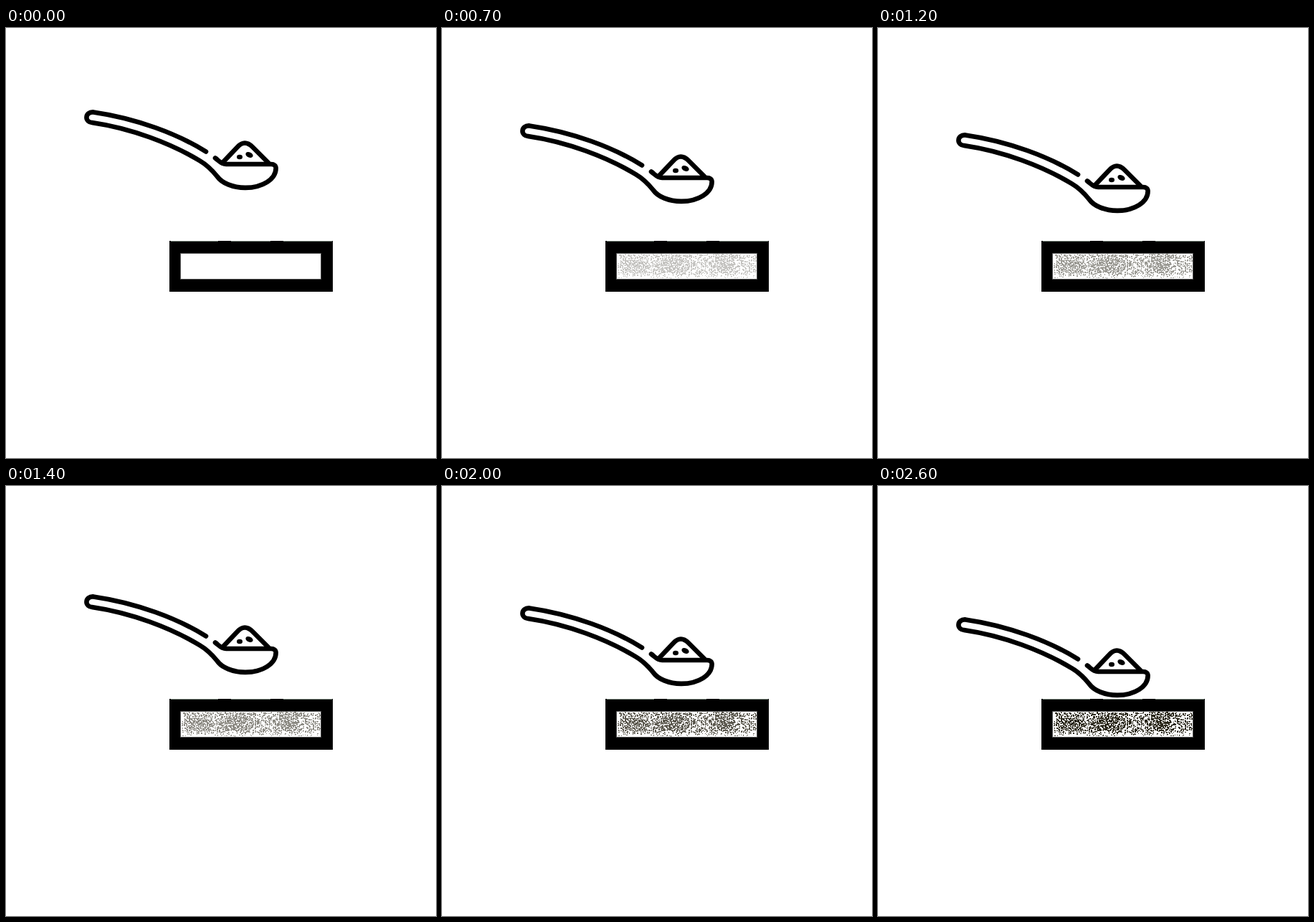
Recreate the animation shown at these times as an HTML page. Size 600 by 600 pixels, loop 3.6 s.

```html
<!DOCTYPE html>
<html lang="en">
<head>
<meta charset="utf-8">
<title>Spoon and tray</title>
<style>
  html, body { margin: 0; width: 100%; height: 100%; overflow: hidden; background: #fff; }
  svg { display: block; width: 100%; height: 100%; }
</style>
</head>
<body>
<svg viewBox="0 0 600 600">
  <g id="tray" shape-rendering="crispEdges">
    <path d="M228 297H456V368H228Z"/>
    <path d="M230 297H296V298H230ZM314 297H369V298H314ZM387 297H455V298H387Z" fill="#7d8a80"/>
    <path d="M243 314H440V351H243Z" fill="#555"/>
    <path d="M244 315H439V350H244Z" fill="#fff"/>
    <path id="grains" fill="none" stroke="#2b281b" stroke-width="1.7"/>
  </g>
  <g id="spoon" fill="none" stroke="#000" stroke-width="6.6" stroke-linecap="round" stroke-linejoin="round">
    <path d="M279 172.5C240 148 182 126 122 117.4C116 117 112.4 120.5 112.4 124.7C112.4 128.7 116 131.7 120 132
      C175 140 230 161 270 185C282 192 289 200 295 207.5C301 216 316 222.9 334 222.9
      C358 222.9 376.6 211 376.6 195.5C376.6 192 374 190 370 190H307C300 190 297 185 292 181.5"/>
    <path d="M303 187L323 166Q333 155 344 166L366 188"/>
    <g fill="#000" stroke="none">
      <ellipse cx="326" cy="180" rx="4" ry="3.2"/>
      <ellipse cx="339.5" cy="177" rx="5.4" ry="3.6" transform="rotate(25 339.5 177)"/>
    </g>
  </g>
</svg>
<script>
const spoon = document.getElementById('spoon');
const grains = document.getElementById('grains');

let seed = 7;
const rand = () => (seed = seed * 16807 % 2147483647) / 2147483647;

// Thicker patches in the powder: x, y, radius
const patches = [[262, 332, 11], [280, 333, 8], [322, 332, 17], [393, 329, 14]];

function density(x, y) {
  const thick = patches.reduce((sum, [px, py, r]) =>
    sum + 0.5 * Math.exp(-((x - px) ** 2 + (y - py) ** 2) / (r * r)), 0.78);
  const fade = Math.min(1, (x - 243) / 7, (353 - y) / 12);
  return thick * fade;
}

// Short strokes in random directions, longer where the powder is thick
let d = '';
for (let y = 317; y < 349; y += 2.4) {
  for (let x = 247; x < 438; x += 2.8) {
    const thick = density(x, y);
    if (rand() > thick) continue;
    const gx = x + rand() * 1.6 - 0.8, gy = y + rand() * 1.6 - 0.8;
    const angle = rand() * Math.PI, half = (0.9 + rand() * 0.8) * thick;
    const dx = Math.cos(angle) * half, dy = Math.sin(angle) * half;
    d += `M${gx - dx} ${gy - dy}L${gx + dx} ${gy + dy}`;
  }
}
grains.setAttribute('d', d);

const LOOP = 3600, STEP = 100, STEPS = 26;
const start = performance.now();

function draw(now) {
  const time = Math.max(0, now - start) % LOOP;
  const n = Math.min(STEPS, Math.floor(time / STEP));
  spoon.setAttribute('transform', `translate(0 ${Math.round(n * 8 / 3)})`);
  grains.setAttribute('opacity', n / STEPS);
  requestAnimationFrame(draw);
}
draw(start);
</script>
</body>
</html>
```
